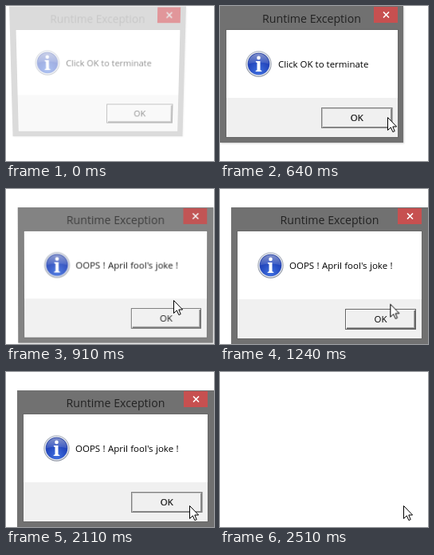
These frames come from a looping animation (261 by 194 pixels, 2580 ms). An HTML page:

```html
<!DOCTYPE html>
<html lang="en">
<head>
<meta charset="utf-8">
<title>Runtime Exception</title>
<style>
  html, body { margin: 0; width: 100%; height: 100%; overflow: hidden; background: #fff; }
  body { position: relative; font: 11.5px "Open Sans", "Noto Sans", sans-serif; color: #000; }
  div, svg { position: absolute; box-sizing: border-box; white-space: nowrap; }

  .win { --frame: 1; --body: 1; --close: #c75050; --side: 8px; animation: 2580ms step-end infinite; }
  #first { --side: 7px; left: 0; top: 0; width: 230px; height: 171px; animation-name: first; }
  #second { left: 14px; top: 23px; width: 247px; height: 171px; animation-name: second; }

  .frame {
    inset: 0; opacity: var(--frame);
    border: solid #717171; border-width: 30px var(--side) 7px 8px;
    box-shadow: 1px 1px 2px rgba(0, 0, 0, .2);
  }
  .frame::after { content: ""; position: absolute; inset: -1px; border: 1px solid #676767; }
  .title { left: -8px; right: calc(0px - var(--side)); top: -24px; font-size: 14.2px; line-height: 20px; text-align: center; color: #222; }
  .close { right: var(--side); top: 1px; width: 30px; height: 20px; background: var(--close); opacity: var(--body); }
  .close svg { left: 10.5px; top: 6px; }
  .client { inset: 30px var(--side) 7px 8px; opacity: var(--body); background: linear-gradient(#fff 85px, #f0f0f0 85px); }
  .icon { left: 24px; top: 26px; }
  .text { left: 65px; top: 34.5px; line-height: 16px; }
  #second .icon { left: 24.5px; }
  #second .text { word-spacing: .4px; }

  .button {
    right: 7px; top: 97px; width: 89px; height: 26px;
    border: 1px solid #646464; background: #f0f0f0;
    box-shadow: inset 1px 1px #fff, inset -1px -1px #696969, inset -2px -2px #a8a8a8;
    line-height: 24px; text-align: center;
    animation: 2580ms step-end infinite;
  }
  #first .button { animation-name: press1; }
  #second .button { animation-name: press2; }

  #cursor { left: 0; top: 0; animation: move 2580ms step-end infinite; }

  @keyframes first {
    0% {
      --frame: .25; --body: .43; --close: #e83c44;
      transform: translateY(-2px) perspective(700px) rotateX(-10deg) scale(.945, .965);
    }
    2.71% {
      --frame: .65; --body: .75; --close: #d84a4c;
      transform: translateY(-1px) perspective(700px) rotateX(-4deg) scale(.975, .985);
    }
    5.42% {
      --frame: .9; --body: .93; --close: #c75050;
      transform: perspective(700px) rotateX(-1deg) scale(.99);
    }
    7.75% { --frame: 1; --body: 1; --close: #c75050; transform: none; }
    29.84% {
      --frame: .4; --body: .5; --close: #c75050;
      transform: perspective(700px) rotateX(-5deg) scale(.96); visibility: visible;
    }
    32.55%, 100% { visibility: hidden; }
  }
  @keyframes second {
    0% { visibility: hidden; }
    32.55% {
      --frame: .45; --body: .6; --close: #d84a4c; visibility: visible;
      transform: translateY(-1px) perspective(700px) rotateX(-7deg) scale(.96, .975);
    }
    35.27% {
      --frame: .87; --body: .9; --close: #c75050; visibility: visible;
      transform: translateY(-.5px) perspective(700px) rotateX(-1deg) scale(.992);
    }
    37.59% { --frame: 1; --body: 1; --close: #c75050; visibility: visible; transform: none; }
    91.85% {
      --frame: .6; --body: .7; --close: #c75050; visibility: visible;
      transform: perspective(700px) rotateX(-3deg) scale(.975);
    }
    94.57% {
      --frame: .2; --body: .25; --close: #c75050; visibility: visible;
      transform: perspective(700px) rotateX(-7deg) scale(.94);
    }
    97.28%, 100% { visibility: hidden; }
  }
  @keyframes press1 {
    24.8%, 100% {
      border-color: #808080; color: #222; text-shadow: .5px 0 #555;
      box-shadow: inset 1px 1px #c4c4c4, inset -1px -1px #8a8a8a, 1px 0 #b0b0b0;
    }
  }
  @keyframes press2 {
    81.78%, 100% {
      border-color: #808080; color: #222; text-shadow: .5px 0 #555;
      box-shadow: inset 1px 1px #c4c4c4, inset -1px -1px #8a8a8a, 1px 0 #b0b0b0;
    }
  }
  @keyframes move {
    0% { transform: translate(262px, 160px); }
    10.46% { transform: translate(262px, 160px); animation-timing-function: steps(10, jump-both); }
    22.09% { transform: translate(210px, 139px); }
    48.06% { transform: translate(210px, 139px); animation-timing-function: steps(5, jump-both); }
    60.85%, 100% { transform: translate(230px, 167px); }
  }
</style>
</head>
<body>
<svg width="0" height="0">
  <defs>
    <linearGradient id="ring" x2="0" y2="1">
      <stop stop-color="#b4bac6"/><stop offset="1" stop-color="#868d9c"/>
    </linearGradient>
    <radialGradient id="blue" cy=".85" r=".85">
      <stop stop-color="#3f70e0"/><stop offset=".6" stop-color="#2346bc"/><stop offset="1" stop-color="#1d389e"/>
    </radialGradient>
    <linearGradient id="gloss" x2="0" y2="1">
      <stop stop-color="#fff" stop-opacity=".45"/><stop offset="1" stop-color="#fff" stop-opacity=".1"/>
    </linearGradient>
    <symbol id="info" viewBox="-16.5 -16.5 33 33">
      <circle r="16.2" fill="url(#ring)"/>
      <circle r="15.2" fill="#dfe3ea"/>
      <circle r="13.8" fill="url(#blue)"/>
      <path d="M-13 0A13 13 0 0 1 13 0Q0 -4 -13 0Z" fill="url(#gloss)"/>
      <circle cy="-7.6" r="2.3" fill="#fff"/>
      <path d="M-3.6 -3.5H2V7.8L3.8 8.5V9.6H-3.8V8.5L-2 7.8V-1.6L-3.6 -2.3Z" fill="#fff"/>
    </symbol>
    <symbol id="cross" viewBox="0 0 9 8">
      <path d="M1 .5L8 7.5M8 .5L1 7.5" stroke="#fff" stroke-width="1.6"/>
    </symbol>
  </defs>
</svg>

<div class="win" id="first">
  <div class="frame"><div class="title">Runtime Exception</div></div>
  <div class="close"><svg width="9" height="8"><use href="#cross"/></svg></div>
  <div class="client">
    <svg class="icon" width="33" height="33"><use href="#info"/></svg>
    <div class="text">Click OK to terminate</div>
    <div class="button">OK</div>
  </div>
</div>

<div class="win" id="second">
  <div class="frame"><div class="title">Runtime Exception</div></div>
  <div class="close"><svg width="9" height="8"><use href="#cross"/></svg></div>
  <div class="client">
    <svg class="icon" width="33" height="33"><use href="#info"/></svg>
    <div class="text">OOPS ! April fool's joke !</div>
    <div class="button">OK</div>
  </div>
</div>

<svg id="cursor" width="13" height="20">
  <path d="M.5 .5V16.5L4.3 12.9L6.9 18.6L9.2 17.6L6.8 12H11.6Z" fill="#fff" stroke="#000"/>
</svg>
</body>
</html>
```
